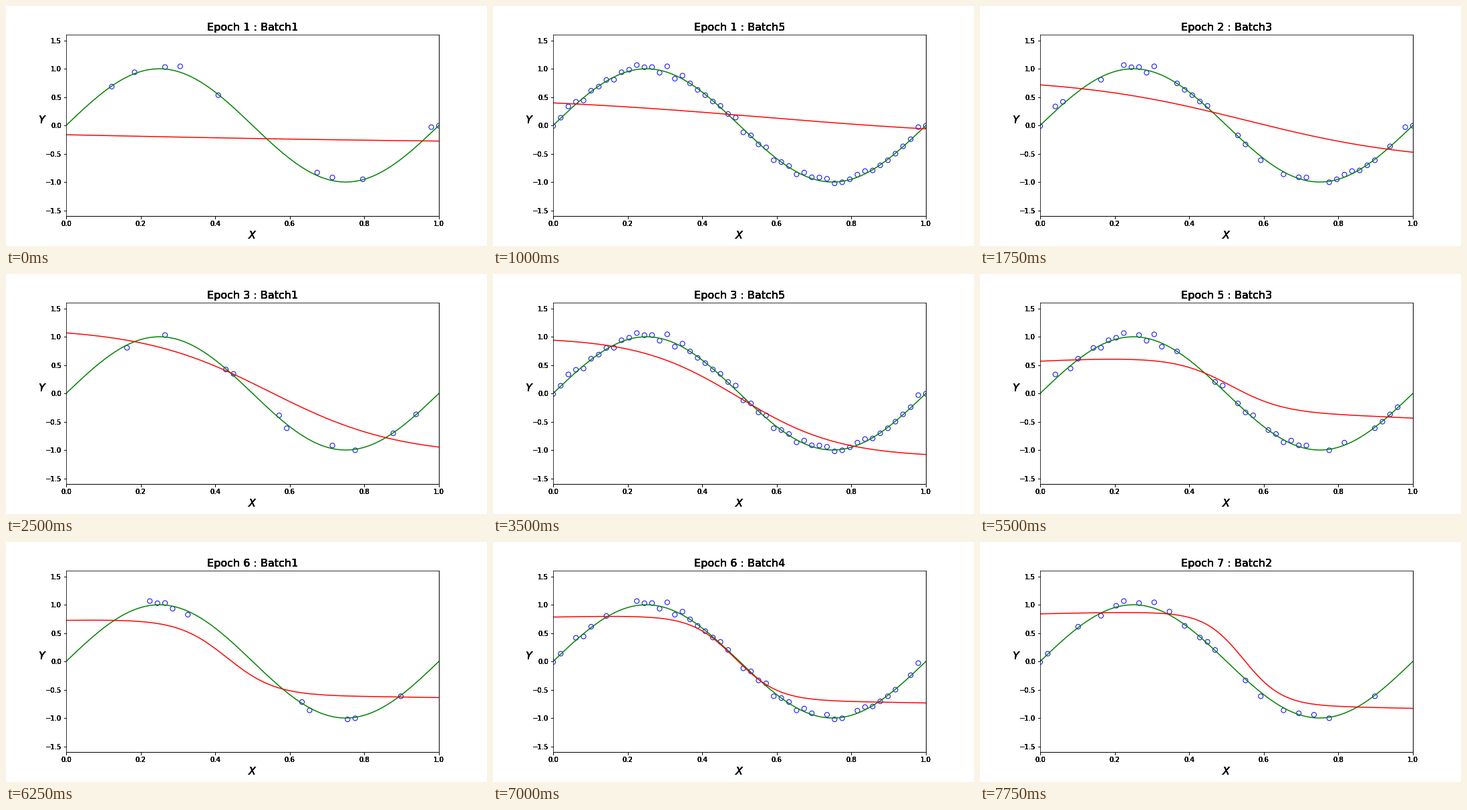
Recreate the animation shown at these times as a matplotlib script. Size 720 by 360 pixels, loop 8 s.

```python
import numpy as np
import matplotlib.pyplot as plt
from matplotlib.animation import FuncAnimation

EPOCHS = 7
BATCHES = 5
STEP = 10          # points added by each batch
SAMPLES = BATCHES * STEP
FRAMES = 32
INTERVAL = 250
LAYERS = 6

# Fit at a few training steps: (middle, amplitude, steepness, centre, arch)
FITS = {
    0: (-.165, .156, .9, 0, 0),
    4: (.148, .372, 1.45, .56, 0),
    10: (.03, 1.13, 2.9, .546, 0),
    13: (-.1, 1.2, 3.2, .5, 0),
    17: (.025, .642, 5.2, .488, .05),
    22: (.066, .504, 6.8, .51, .3),
    25: (.044, .683, 7.6, .431, .1),
    31: (.005, .835, 9.5, .545, .15),
}


def fitted(step, x):
    """A falling tanh step plus a slight arch, its shape eased between fits."""
    mid, amp, steep, centre, arch = (
        np.interp(step, list(FITS), values) for values in zip(*FITS.values()))
    return mid - amp * np.tanh(steep * (x - centre)) + arch * x * (1 - x)


def sine(x):
    return np.sin(2 * np.pi * x)


def add_layer(fig):
    ax = fig.add_axes([0.125, 0.125, 0.775, 0.755], facecolor="none")
    ax.set(xlim=(0, 1), ylim=(-1.6, 1.6))
    ax.set_xlabel("$X$", fontsize=16)
    ax.set_ylabel("$Y$", fontsize=16, rotation=0)
    return ax


rng = np.random.default_rng(4)
x_train = np.linspace(0, 1, SAMPLES)
y_train = sine(x_train) + rng.normal(0.015, 0.04, SAMPLES)
orders = [rng.permutation(SAMPLES) for _ in range(EPOCHS)]

plt.rcParams["font.family"] = "DejaVu Sans"
fig = plt.figure(figsize=(10, 5), dpi=72, facecolor="white")
# Stacked layers give the lettering and the outer edges a heavier weight
layers = [add_layer(fig) for _ in range(LAYERS)]
titles = [ax.set_title("", fontsize=16) for ax in layers]
for extra in layers[1:]:
    extra.spines[["top", "left"]].set_visible(False)

ax = layers[0]
x = np.linspace(0, 1, 200)
points = ax.scatter([], [], s=50, facecolor="none", edgecolor="b", linewidth=1)
ax.plot(x, sine(x), color="g", lw=1.5)
fit_line, = ax.plot([], [], color="r", lw=1.5)


def update(step):
    epoch, batch = divmod(step, BATCHES)
    seen = orders[epoch][:STEP * (batch + 1)]
    points.set_offsets(np.column_stack([x_train[seen], y_train[seen]]))
    fit_line.set_data(x, fitted(step, x))
    for title in titles:
        title.set_text(f"Epoch {epoch + 1} : Batch{batch + 1}")
    return [points, fit_line, *titles]


anim = FuncAnimation(fig, update, frames=FRAMES, interval=INTERVAL,
                     repeat=True, repeat_delay=0)
plt.show()
```
